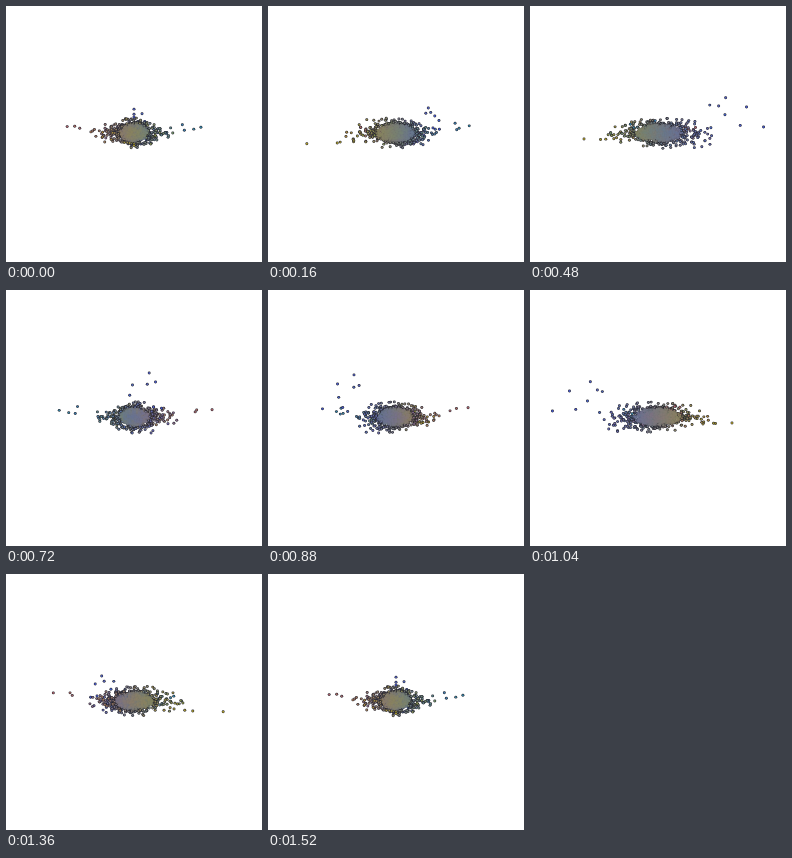
Write an HTML page with a canvas that moves like this. It is 256 px wide and 256 px high and loops after 1.6 s.

```html
<!DOCTYPE html>
<html>
<head>
<meta charset="utf-8">
<style>
html, body { margin: 0; width: 100%; height: 100%; overflow: hidden; background: #fff; }
canvas { display: block; width: 256px; height: 256px; }
</style>
</head>
<body>
<canvas id="stage" width="256" height="256"></canvas>
<script>
const ctx = document.getElementById('stage').getContext('2d');
const CAMERA = 217, CX = 128, CY = 127, STEP = 80, STEPS = 20;

let seed = 20;
function random() {
  seed = (seed * 1664525 + 1013904223) % 4294967296;
  return (seed + 1) / 4294967297;
}
const bell = () => (random() + random() + random() - 1.5) * 2;

// Two-sided exponential spread, limited to a maximum distance
function spread(scale, limit) {
  let v;
  do v = -Math.log(random()) * scale; while (v > limit);
  return random() < 0.5 ? -v : v;
}

// Position also sets the hue: x runs red to teal, z runs yellow to blue
function makePoint(x, y, z, core = false) {
  const shade = v => Math.round(Math.max(45, Math.min(205, v)));
  const r = shade(122 - 0.9 * x - 0.6 * z);
  const g = shade(123 + 0.2 * x - 0.4 * z);
  const b = shade(122 + 0.5 * x + 1.1 * z);
  return { x, y, z, core, color: `rgb(${r},${g},${b})` };
}

const outliers = [
  [0, -31, 65], [0, -22, 82], [0, -5, 95], [0, -24, 59], [10, -24, 53],
  [14, -15, 66], [0, -6.5, 77], [0, 7, -95], [0, 7.4, -71], [-3, 7, -66],
  [70, -6, 10], [62, -4, 8], [53, -9, 21], [55, -3, 20],
  [-73, -7, 20], [-62, -7, 10], [-58, -5, 15]
];
const points = outliers.map(p => makePoint(...p));

for (let i = 0; i < 850; i++) {
  const x = spread(9, 46);
  const y = bell() * 6.2 / (1 + Math.abs(x) / 45);
  points.push(makePoint(x, y, spread(15, 56) + 2));
}

for (let i = 0; i < 1100; i++) {
  const a = random() * Math.PI * 2, u = random() * 2 - 1;
  const r = Math.pow(random(), 0.5), ring = Math.sqrt(1 - u * u) * r;
  points.push(makePoint(ring * Math.cos(a) * 14, u * r * 9, ring * Math.sin(a) * 25, true));
}

function disc(x, y, radius, color) {
  ctx.fillStyle = color;
  ctx.beginPath();
  ctx.arc(x, y, radius, 0, Math.PI * 2);
  ctx.fill();
}

function draw(angle) {
  const c = Math.cos(angle), s = Math.sin(angle);
  for (const p of points) {
    p.depth = p.x * s - p.z * c;
    const zoom = CAMERA / (CAMERA - p.depth);
    p.sx = CX + (p.x * c + p.z * s) * zoom;
    p.sy = CY + p.y * zoom;
  }
  points.sort((a, b) => a.core - b.core || a.depth - b.depth);
  ctx.fillStyle = '#fff';
  ctx.fillRect(0, 0, 256, 256);
  for (const p of points) {
    ctx.globalAlpha = p.core ? 0.5 : 1;
    if (!p.core) disc(p.sx, p.sy, 1.45, '#23232b');
    disc(p.sx, p.sy, p.core ? 1.2 : 0.95, p.color);
  }
  ctx.globalAlpha = 1;
}

let shown = -1;
function tick() {
  const step = Math.floor(performance.now() / STEP) % STEPS;
  if (step !== shown) draw(step / (STEPS - 1) * Math.PI * 2);
  shown = step;
  requestAnimationFrame(tick);
}
tick();
</script>
</body>
</html>
```
